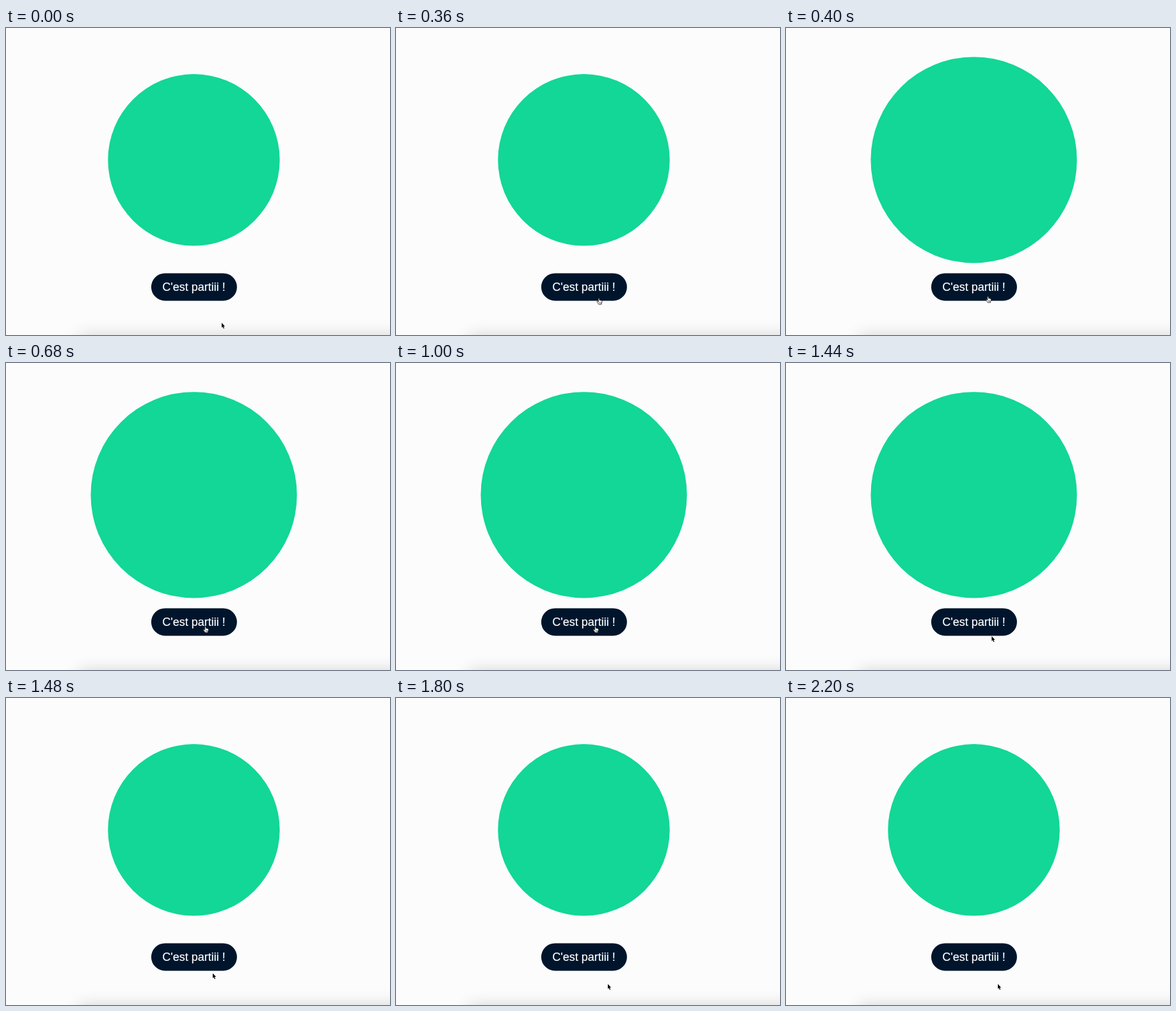
These frames come from a looping animation (600 px wide and 480 px high, 8 s). An HTML page:

```html
<!DOCTYPE html>
<html lang="fr">
<head>
<meta charset="utf-8">
<title>C'est partiii !</title>
<style>
  html, body { margin: 0; width: 100%; height: 100%; overflow: hidden; background: #fcfcfc; }
  #stage { position: relative; width: 600px; height: 480px; overflow: hidden; }
  svg { position: absolute; inset: 0; display: block; }
  #panel {
    position: absolute; left: 115px; top: 482px; width: 620px; height: 80px;
    box-shadow: 0 0 24px rgba(0, 0, 0, .19);
  }
  text {
    font: 18px "Liberation Sans", Arial, sans-serif; text-anchor: middle;
    fill: #fff; stroke: #fff; stroke-width: .2px;
  }
</style>
</head>
<body>
<div id="stage">
  <div id="panel"></div>
  <svg width="600" height="480" viewBox="0 0 600 480">
    <circle id="ball" cx="293.5" cy="206.3" r="134.2" fill="#12d796"/>
    <rect x="226.9" y="383.4" width="134" height="43" rx="21.5" fill="#00152c"/>
    <text x="293.5" y="411">C'est partiii !</text>
    <g id="cursor">
      <path id="arrow" d="M0 0V7.6L1.6 6.1L2.9 9.1L4.2 8.5L2.9 5.6H5.2Z"
        fill="#000" stroke="#fff" stroke-width=".8" paint-order="stroke"/>
      <g id="hand">
        <path d="M-.9 .4Q0 -.7 .8 .4L1.2 3Q2 2.4 2.6 3.1Q3.4 2.7 3.9 3.5Q5 3.2 5.1 4.5
          Q5.2 6.4 4.2 7.7V9.4H-.3Q-.8 8 -2.5 6.2Q-3.4 4.9 -2.2 4.6Q-1.4 4.7 -.5 5.6Z"
          fill="#fff" stroke="#111" stroke-width=".8" stroke-linejoin="round"/>
        <path d="M.9 6V8M2.2 6V8M3.4 6V8" stroke="#222" stroke-width=".6"/>
      </g>
    </g>
  </svg>
</div>
<script>
  const LOOP = 8000, STEP = 40;
  const ENTER = 360, LEAVE = 1440;
  const from = { x: 337, y: 461 }, rest = { x: 311.3, y: 412 }, to = { x: 331, y: 447.2 };

  const $ = id => document.getElementById(id);
  const [ball, cursor, arrow, hand] = ['ball', 'cursor', 'arrow', 'hand'].map($);
  const show = (el, on) => el.setAttribute('visibility', on ? 'visible' : 'hidden');

  const progress = (t, start, length) => Math.min(1, Math.max(0, (t - start) / length));
  const easeOut = k => Math.sin(k * Math.PI / 2);
  const easeInOut = k => (1 - Math.cos(k * Math.PI)) / 2;
  const mix = (a, b, k) => a + (b - a) * k;

  function pointerAt(t) {
    const near = easeOut(progress(t, 0, 630));
    const away = easeInOut(progress(t, 1120, 700));
    // the way out bends: x runs slightly ahead of y
    return [
      mix(mix(from.x, rest.x, near), to.x, away ** .8),
      mix(mix(from.y, rest.y, near), to.y, away)
    ];
  }

  const between = t => t >= ENTER && t < LEAVE;

  function draw(t) {
    const over = between(t);
    // the ball reacts one step after the pointer
    ball.setAttribute('r', between(t - STEP) ? 161.1 : 134.2);
    cursor.setAttribute('transform', `translate(${pointerAt(t)})`);
    show(arrow, !over);
    show(hand, over);
  }

  const start = performance.now();
  function tick() {
    const t = (performance.now() - start) % LOOP;
    draw(Math.floor(t / STEP) * STEP);
    requestAnimationFrame(tick);
  }
  tick();
</script>
</body>
</html>
```
